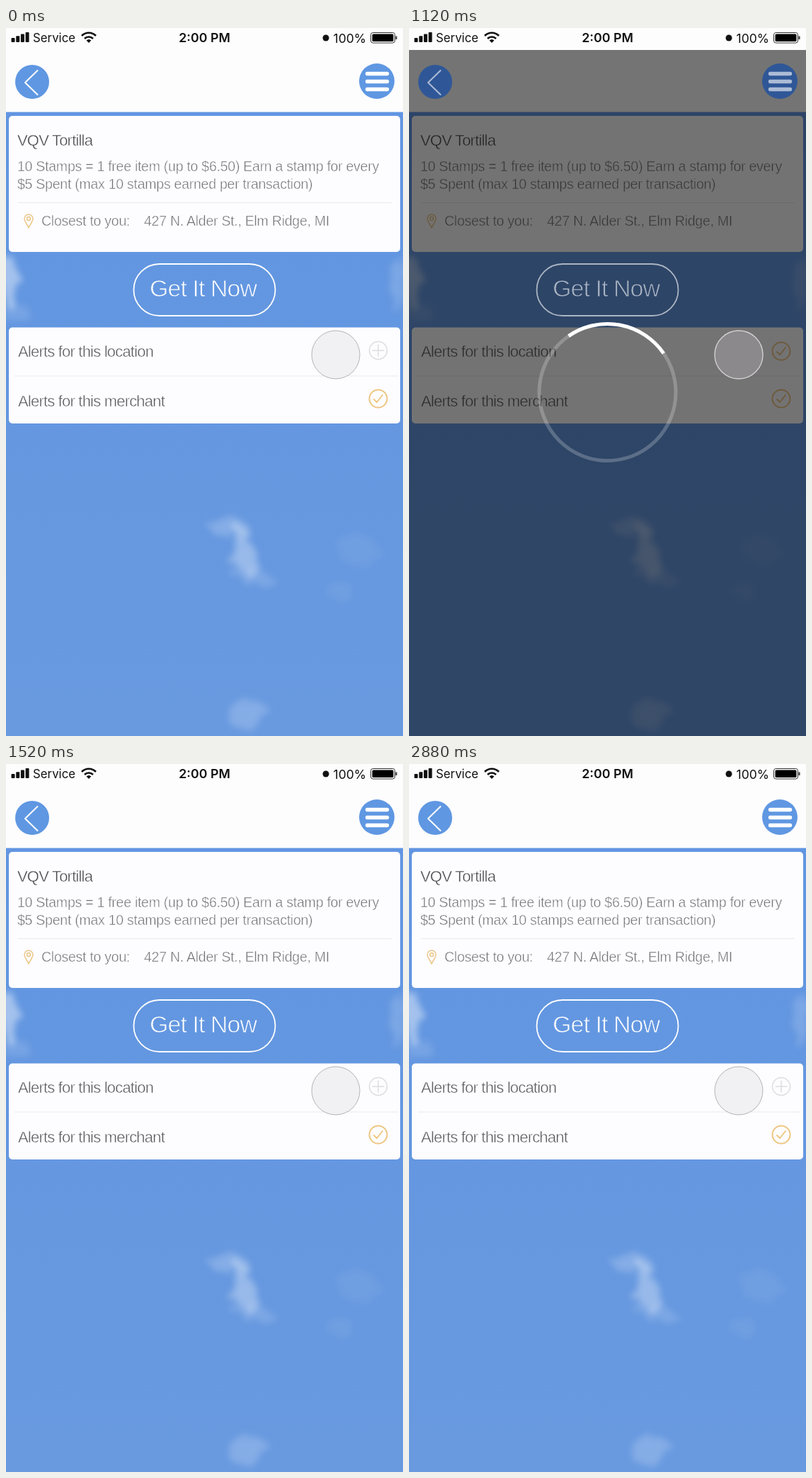
An HTML page for the animation above (2920 ms loop, 561 px wide and 999 px high).

```html
<!DOCTYPE html>
<html lang="en">
<head>
<meta charset="utf-8">
<title>Stamp card alerts</title>
<style>
  html, body { margin: 0; width: 100%; height: 100%; overflow: hidden; background: #fff; }
  svg { display: block; width: 561px; height: 999px; --sky: #6497e0; --button: #5f97e2; }
  svg.busy { --sky: #2d4469; --button: #2f5797; }
  text { font-family: "Liberation Sans", Arial, sans-serif; white-space: pre; }
  .status text { font-family: Inter, sans-serif; fill: #111; }
  /* a thin outline in the card colour makes the letters light */
  .thin { stroke: #fdfcfe; stroke-width: .5px; }
  .title { font-size: 22px; letter-spacing: -.8px; fill: #464649; }
  .row { font-size: 22px; letter-spacing: -.8px; fill: #58585b; }
  .body { font-size: 19.6px; letter-spacing: -.297px; fill: #717174; }
  .action { font-size: 34px; letter-spacing: -.95px; fill: #fff; stroke: var(--sky); stroke-width: .9px; }
  .line { fill: none; stroke-linecap: round; stroke-linejoin: round; }
  .gold { stroke: #eec682; stroke-width: 2; }
  .disc { fill: var(--button); }
  .touch { fill: #f1f0f2; stroke: #b4b4b7; stroke-width: 1; }
  .busy .touch { fill: #8b898b; stroke: #d2d1d2; stroke-width: 1.4; }
  .over { opacity: 1; }
  .busy .over { opacity: .6; }
  .load, .busy .idle { display: none; }
  .busy .load { display: inline; }
</style>
</head>
<body>
<svg id="stage" viewBox="0 0 561 999" xmlns="http://www.w3.org/2000/svg">
  <defs>
    <linearGradient id="sky" x1="0" y1="0" x2="0" y2="1">
      <stop offset="0" stop-color="#6095e2"/>
      <stop offset=".5" stop-color="#6497e0"/>
      <stop offset="1" stop-color="#699ae0"/>
    </linearGradient>
    <filter id="wisp" x="-60%" y="-60%" width="220%" height="220%" color-interpolation-filters="sRGB">
      <feTurbulence type="fractalNoise" baseFrequency=".035" numOctaves="3" seed="4"/>
      <feDisplacementMap in="SourceGraphic" scale="34" xChannelSelector="R" yChannelSelector="G"/>
      <feGaussianBlur stdDeviation="5"/>
    </filter>
    <g id="check" class="line gold">
      <circle r="12.5"/>
      <path d="M-6 1L-2 5L6-5"/>
    </g>
  </defs>

  <rect width="561" height="999" fill="url(#sky)"/>
  <g id="clouds" fill="#fff" filter="url(#wisp)"></g>

  <rect width="561" height="118" fill="#fdfdfe"/>
  <path d="M0 118.5H561" stroke="#b9cfee"/>

  <g fill="#fdfcfe">
    <rect x="4" y="124" width="553" height="192" rx="5"/>
    <rect x="4" y="422.500" width="553" height="135.500" rx="5"/>
  </g>
  <path d="M17 246.500H545M12 491H553" stroke="#e9e8eb"/>

  <text class="thin title" x="16" y="166">VQV Tortilla</text>
  <g class="thin">
    <text class="body" x="16" y="201.500">10 Stamps = 1 free item (up to $6.50) Earn a stamp for every</text>
    <text class="body" x="16" y="226.500">$5 Spent (max 10 stamps earned per transaction)</text>
    <text class="body" x="50" y="279">Closest to you:</text>
    <text class="body" x="195" y="279">427 N. Alder St., Elm Ridge, MI</text>
    <text class="row" x="17" y="463.500">Alerts for this location</text>
    <text class="row" x="17" y="534">Alerts for this merchant</text>
  </g>

  <g class="line" stroke="#ebc78a" stroke-width="1.500">
    <path d="M32 282C30 277 26 273 26 269A6 6 0 0 1 38 269C38 273 34 277 32 282Z"/>
    <circle cx="32" cy="269" r="2.500"/>
  </g>

  <g class="line idle" stroke="#dddcdf" stroke-width="1.500">
    <circle cx="526" cy="455" r="12.500"/>
    <path d="M518 455H534M526 447V463"/>
  </g>
  <use class="load" href="#check" x="526" y="456"/>
  <use href="#check" x="526" y="523"/>

  <rect class="load" y="31" width="561" height="968" opacity=".54"/>

  <circle class="disc" cx="37" cy="76" r="24"/>
  <circle class="disc" cx="524" cy="75" r="25"/>
  <g class="over line" stroke="#fff">
    <path d="M44.500 60L27 77L44.500 94" stroke-width="2"/>
    <path d="M510.500 64.500H538.500M510.500 75.500H538.500M510.500 86.500H538.500" stroke-width="5.500"/>
  </g>
  <g class="over">
    <rect class="line" x="180.500" y="333" width="200" height="73" rx="36.500" stroke="#fff" stroke-width="1.800"/>
    <text class="action" x="203" y="379">Get It Now</text>
  </g>

  <circle class="touch" cx="466" cy="461" r="34"/>

  <g class="load" transform="translate(280.500 514)" fill="none" stroke="#fff" stroke-width="5">
    <circle r="96.500" opacity=".22"/>
    <path id="arc" d="M-68.240-68.240A96.500 96.500 0 0 1 68.240-68.240"/>
  </g>

  <g class="status">
    <g id="bars" fill="#111"></g>
    <text x="38" y="20" font-size="16.800">Service</text>
    <g fill="none" stroke="#111" stroke-width="2.600">
      <path d="M107 11A14 14 0 0 1 127 11"/>
      <path d="M111 15A8.500 8.500 0 0 1 123 15"/>
    </g>
    <path d="M117 21L113.600 17.500A5 5 0 0 1 120.400 17.500Z" fill="#111"/>
    <text x="280.500" y="20" font-size="17.800" font-weight="600" text-anchor="middle">2:00 PM</text>
    <circle cx="452" cy="14" r="4.500" fill="#111"/>
    <text x="509" y="20.500" font-size="17.500" text-anchor="end">100%</text>
    <rect x="515.500" y="6.500" width="34" height="14.500" rx="3" fill="none" stroke="#333"/>
    <rect x="517.500" y="8.500" width="30" height="10.500" rx="1.500" fill="#000"/>
    <path d="M551.500 11.500V16" stroke="#333" stroke-width="2"/>
  </g>
</svg>
<script>
  const LOOP = 2920, STEP = 40;
  const BUSY_FROM = 1120, BUSY_TO = 1520;
  const SPIN_START = 10.300, SPIN_RATE = 121 / 360;

  const stage = document.getElementById("stage");
  const arc = document.getElementById("arc");

  function add(parent, tag, attrs) {
    const el = document.createElementNS("http://www.w3.org/2000/svg", tag);
    for (const key in attrs) el.setAttribute(key, attrs[key]);
    document.getElementById(parent).appendChild(el);
  }

  // centre, radii, tilt, opacity
  const clouds = [
    [4, 358, 13, 40, -8, .42],
    [14, 400, 22, 12, 10, .12],
    [554, 362, 11, 36, 0, .16],
    [337, 742, 17, 36, -18, .32],
    [318, 706, 34, 10, 12, .2],
    [350, 775, 32, 9, 10, .14],
    [500, 738, 36, 22, 20, .06],
    [472, 798, 20, 12, 0, .06],
    [340, 966, 26, 16, -25, .19]
  ];
  for (const [cx, cy, rx, ry, tilt, opacity] of clouds) {
    add("clouds", "ellipse", { cx, cy, rx, ry, opacity, transform: `rotate(${tilt} ${cx} ${cy})` });
  }

  for (let i = 0; i < 4; i++) {
    const height = 6 + 2.700 * i;
    add("bars", "rect", { x: 7.500 + 6.700 * i, y: 20 - height, width: 5, height, rx: 1 });
  }

  function draw(time) {
    const t = Math.floor((time % LOOP) / STEP) * STEP;
    stage.classList.toggle("busy", t >= BUSY_FROM && t < BUSY_TO);
    arc.setAttribute("transform", `rotate(${SPIN_START + (t - BUSY_FROM) * SPIN_RATE})`);
  }

  const start = performance.now();
  function tick() {
    draw(performance.now() - start);
    requestAnimationFrame(tick);
  }
  tick();
</script>
</body>
</html>
```
